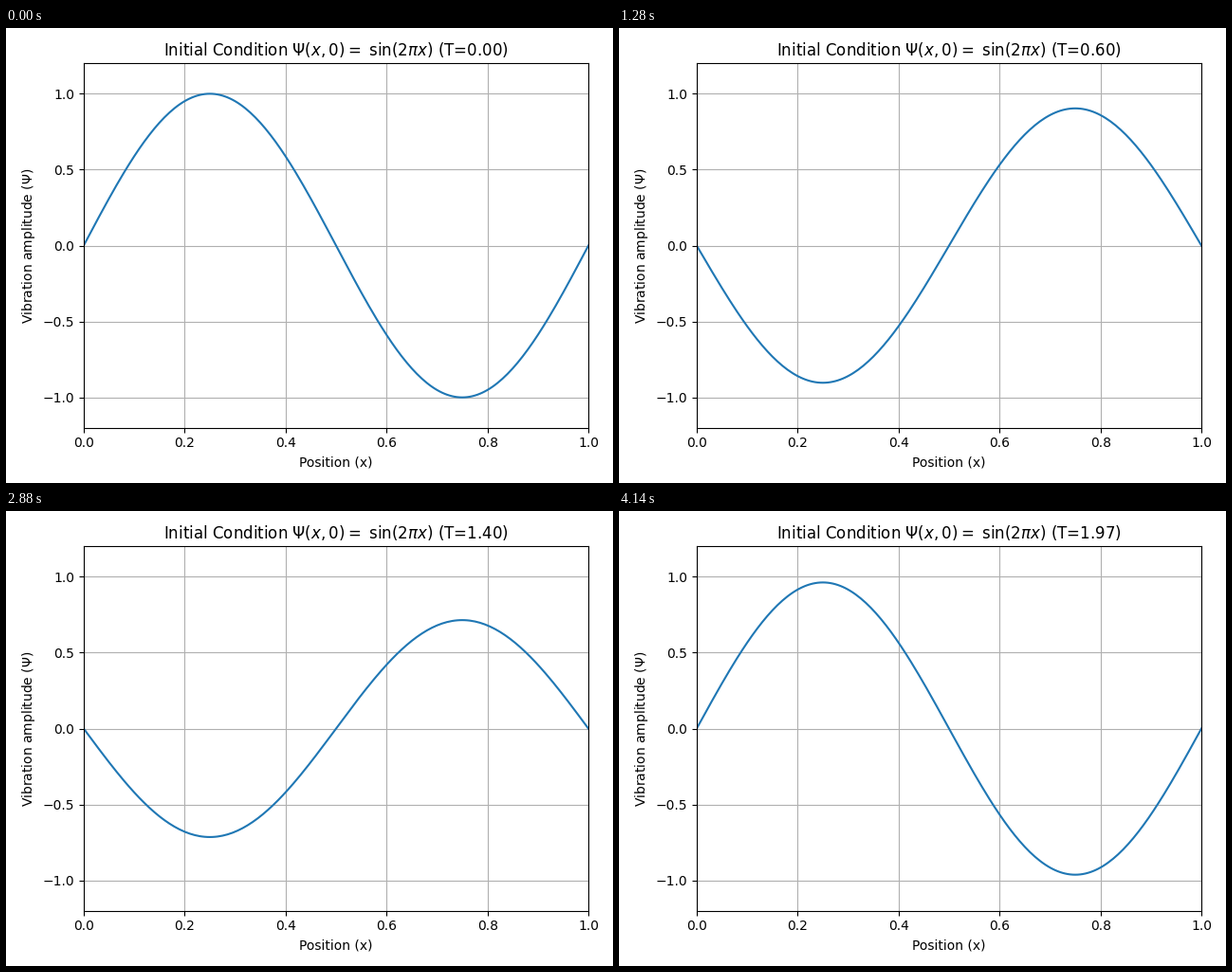
A matplotlib script that plays this animation: 640 px wide and 480 px high, repeating every 4.16 s.

```python
import numpy as np
import matplotlib.pyplot as plt
from matplotlib.animation import FuncAnimation

TICK = 20                # ms per animation frame
LOOP = 4160              # ms
CYCLE = 13               # ticks in which five time steps are shown
STARTS = (1, 6, 7, 12)   # ticks within a cycle at which a new step appears
KICK = 0.161             # amplitude of the sine part, from the initial velocity
TOP_MARGIN = 37 + 1 / 3  # px: outer pad, title ascent and title pad

x = np.linspace(0, 1, 201)
mode = np.sin(2 * np.pi * x)


def step_at(tick):
    cycle, rest = divmod(tick, CYCLE)
    return 5 * cycle + sum(rest >= s for s in STARTS)


def amplitude(step):
    phase = 2 * np.pi * step / 40
    return np.cos(phase) + KICK * np.sin(phase)


def title_text(step):
    hundredths = step * 5 // 2
    return (r"Initial Condition $\Psi(x,0)=$ $\sin(2\pi x)$ "
            f"(T={hundredths / 100:.2f})")


fig, ax = plt.subplots(figsize=(6.4, 4.8), dpi=100)
line, = ax.plot(x, mode)
ax.set_xlim(0, 1)
ax.set_ylim(-1.2, 1.2)
ax.set_xlabel("Position (x)")
ax.set_ylabel(r"Vibration amplitude ($\Psi$)")
title = ax.set_title(title_text(0))
ax.grid(True)
fig.tight_layout()
fig.subplots_adjust(top=1 - TOP_MARGIN / 480,
                    right=fig.subplotpars.right + 1e-4)


def update(tick):
    step = step_at(tick)
    line.set_ydata(amplitude(step) * mode)
    title.set_text(title_text(step))
    return line, title


anim = FuncAnimation(fig, update, frames=LOOP // TICK, interval=TICK,
                     repeat=True, repeat_delay=0, blit=False)
plt.show()
```
